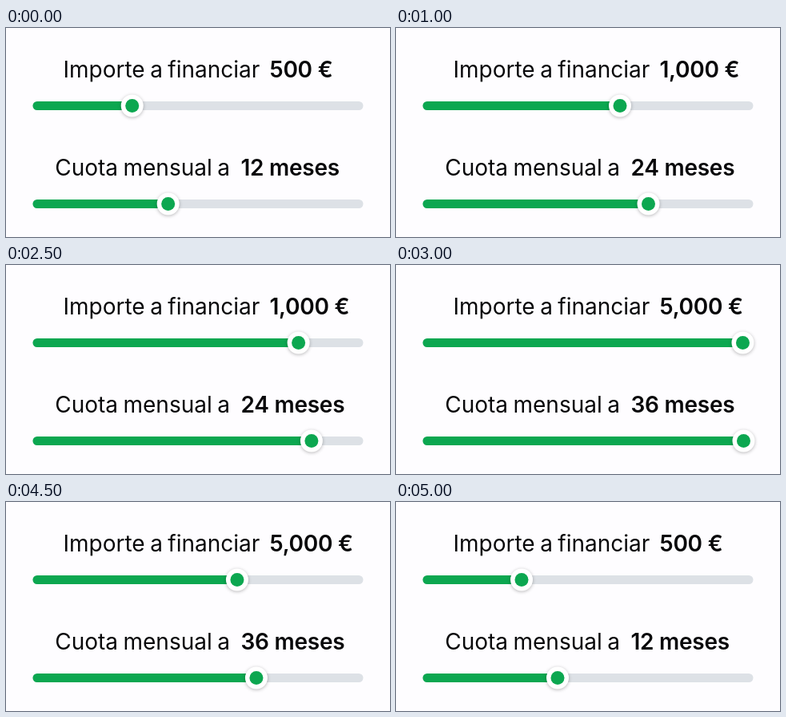
These frames come from a looping animation (480 px wide and 262 px high, 5900 ms). An HTML page with a canvas:

```html
<!DOCTYPE html>
<html lang="es">
<head>
<meta charset="utf-8">
<title>Financiación</title>
<style>
  html, body { margin: 0; width: 100%; height: 100%; overflow: hidden; background: #fefdff; }
  canvas { display: block; width: 480px; height: 262px; }
</style>
</head>
<body>
<canvas id="stage"></canvas>
<script>
const WIDTH = 480, HEIGHT = 262, LOOP = 5900, STEP = 100, MOVE_STEPS = 10.3;
const GREEN = '#0ca750', GREY = '#dde1e6', INK = '#08080a', PAPER = '#fefdff';

const canvas = document.getElementById('stage');
const ratio = window.devicePixelRatio || 1;
canvas.width = WIDTH * ratio;
canvas.height = HEIGHT * ratio;
const ctx = canvas.getContext('2d');
ctx.scale(ratio, ratio);

// Resting values and knob positions of both sliders
const stops = [
  { amount: '500 €', months: '12 meses', top: 157, bottom: 202 },
  { amount: '1,000 €', months: '24 meses', top: 280, bottom: 315.5 },
  { amount: '5,000 €', months: '36 meses', top: 433.5, bottom: 434.5 }
];
// lead: part of a step already travelled when the move begins
const moves = [
  { start: 0, from: 0, to: 1, lead: 0.5 },
  { start: 2000, from: 1, to: 2, lead: 0.53 },
  { start: 4000, from: 2, to: 0, lead: 0.3 }
];

const ease = t => (1 - Math.cos(Math.PI * t)) / 2;
const mix = (a, b, p) => a + (b - a) * p;

function stateAt(time) {
  const move = moves.filter(m => time >= m.start).pop();
  const n = Math.floor((time - move.start) / STEP);
  const resting = n === 0 && move.start > 0;
  const p = resting ? 0 : ease(Math.min(1, (n + move.lead) / MOVE_STEPS));
  const a = stops[move.from], b = stops[move.to];
  const label = n >= 7 ? b : a;
  return {
    amount: label.amount,
    months: label.months,
    top: mix(a.top, b.top, p),
    bottom: mix(a.bottom, b.bottom, p)
  };
}

function text(string, x, y, weight, letterSpacing, wordSpacing) {
  ctx.font = `${weight} 28px Inter, sans-serif`;
  ctx.letterSpacing = letterSpacing + 'px';
  ctx.wordSpacing = wordSpacing + 'px';
  ctx.fillStyle = INK;
  ctx.fillText(string, x, y);
}

const label = (string, x, y) => text(string, x, y, 400, 0, -1.4);
const value = (string, x, y) => text(string, x, y, 600, -0.25, 0);

function bar(x1, x2, y, color) {
  ctx.strokeStyle = color;
  ctx.lineWidth = 11;
  ctx.lineCap = 'round';
  ctx.beginPath();
  ctx.moveTo(x1, y);
  ctx.lineTo(x2, y);
  ctx.stroke();
}

function disc(x, y, radius, color) {
  ctx.fillStyle = color;
  ctx.beginPath();
  ctx.arc(x, y, radius, 0, Math.PI * 2);
  ctx.fill();
}

function slider(x, y) {
  bar(39, 441, y, GREY);
  bar(39, x, y, GREEN);
  ctx.save();
  ctx.shadowColor = 'rgba(0, 0, 0, 0.28)';
  ctx.shadowBlur = 4 * ratio;
  ctx.shadowOffsetY = ratio;
  disc(x, y, 14, '#fff');
  ctx.restore();
  disc(x, y, 8.5, GREEN);
}

function draw(now) {
  const state = stateAt(now % LOOP);
  ctx.fillStyle = PAPER;
  ctx.fillRect(0, 0, WIDTH, HEIGHT);
  label('Importe a financiar', 71.5, 61.5);
  value(state.amount, 329.5, 61.5);
  label('Cuota mensual a', 61.2, 184.5);
  value(state.months, 293.5, 184.5);
  slider(state.top, 97.5);
  slider(state.bottom, 220.5);
}

const origin = performance.now();
function tick() {
  draw(performance.now() - origin);
  requestAnimationFrame(tick);
}
tick();
</script>
</body>
</html>
```
